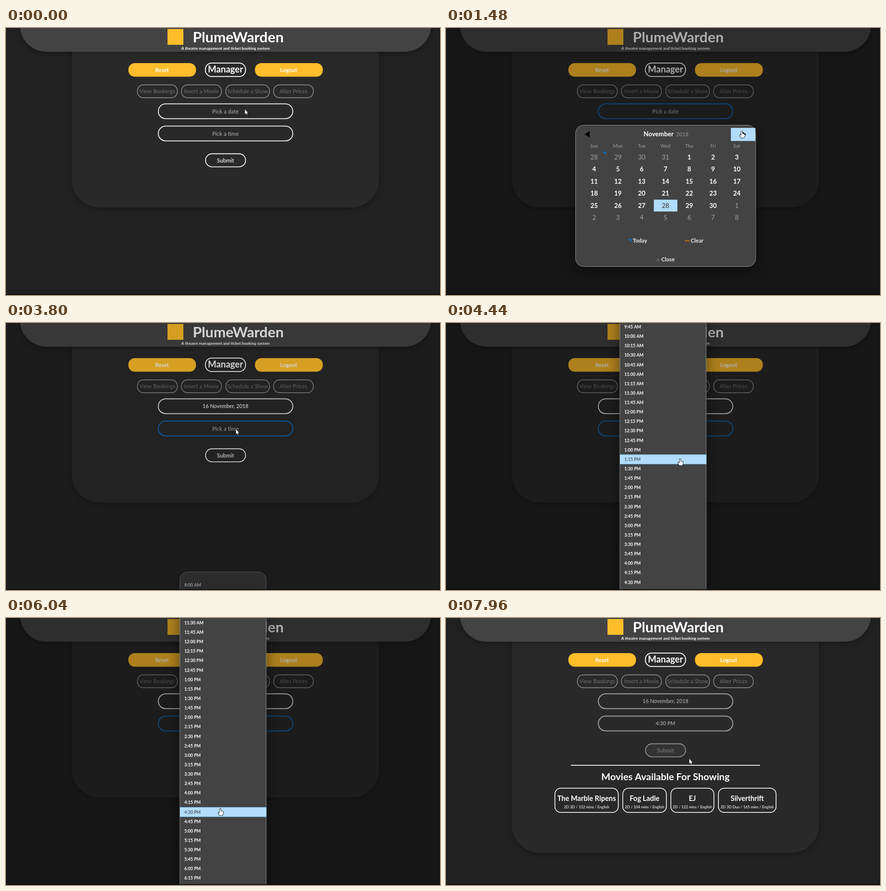
An HTML page with a canvas that plays this animation: 876x540 px, repeating every 8000 ms.

```html
<!DOCTYPE html>
<html lang="en">
<head>
<meta charset="utf-8">
<title>Schedule a show</title>
<style>
html, body { margin: 0; width: 100%; height: 100%; overflow: hidden; background: #212121; }
canvas { display: block; }
</style>
</head>
<body>
<canvas id="stage" width="876" height="540"></canvas>
<script>
const ctx = document.getElementById('stage').getContext('2d');
const LOOP = 8000, ROW = 19.13;
const PICK = '#b1dcfb', GREY = '#434343', GOLD = '#ffbd2b', BLUE = '#0d6cc0';
const SUBMITTED = 7100;

// Keyframes: [time, value, value...], eased between neighbours
const cursorKeys = [
  [0, 482, 164.5], [380, 462, 169], [740, 468, 167], [860, 474, 172], [1380, 597, 209],
  [1520, 597, 209], [1850, 520, 330], [2080, 497, 364], [2460, 550, 304], [3060, 550, 304],
  [3720, 464, 215], [3860, 464, 215], [4300, 472.5, 275], [4700, 472.5, 275],
  [5700, 432.5, 386], [6460, 432.5, 386], [6980, 462, 266], [7140, 462, 266], [7800, 491, 285]
];
const scrollKeys = [[3960, 0], [4380, 196.5], [4760, 196.5], [5240, 262], [5400, 262], [5860, 328.5]];

function track(keys, t) {
  const n = keys.findIndex(k => k[0] > t);
  if (n < 0) return keys[keys.length - 1].slice(1);
  if (n === 0) return keys[0].slice(1);
  const a = keys[n - 1], b = keys[n];
  const u = (t - a[0]) / (b[0] - a[0]), e = u * u * (3 - 2 * u);
  return a.slice(1).map((v, i) => v + (b[i + 1] - v) * e);
}

const clamp = v => Math.max(0, Math.min(1, v));
const easeOut = v => 1 - (1 - clamp(v)) ** 2;
const openness = (t, start, end) => easeOut((t - start) / 160) - easeOut((t - end) / 160);

function text(str, x, y, size, color = '#fff', weight = 400, align = 'center') {
  ctx.font = `${weight} ${size}px Lato, sans-serif`;
  ctx.textAlign = align;
  ctx.fillStyle = color;
  ctx.fillText(str, x, y + size * 0.36);
}

function rect(x, y, w, h, color) {
  ctx.fillStyle = color;
  ctx.fillRect(x, y, w, h);
}

function poly(color, ...pts) {
  ctx.beginPath();
  pts.forEach(([x, y]) => ctx.lineTo(x, y));
  ctx.closePath();
  ctx.fillStyle = color;
  ctx.fill();
}

function box(x0, y0, x1, y1, r, { fill, stroke, line = 1, shadow = 0, drop = 0, dark = 0.5 }) {
  const inset = stroke ? line / 2 : 0;
  ctx.beginPath();
  ctx.roundRect(x0 + inset, y0 + inset, x1 - x0 - 2 * inset, y1 - y0 - 2 * inset, r);
  if (fill) {
    ctx.save();
    ctx.shadowColor = shadow ? `rgba(0,0,0,${dark})` : 'transparent';
    ctx.shadowBlur = shadow;
    ctx.shadowOffsetY = drop;
    ctx.fillStyle = fill;
    ctx.fill();
    ctx.restore();
  }
  if (stroke) {
    ctx.strokeStyle = stroke;
    ctx.lineWidth = line;
    ctx.stroke();
  }
}

function field(y, value, hint, focused, disabled) {
  box(306.5, y - 16, 579.8, y + 15.8, 15, { stroke: focused ? BLUE : disabled ? '#a8a8a8' : '#ececec', line: 1.8 });
  text(value || hint, 443, y, value ? 10.5 : 11.2, value && !disabled ? '#fff' : '#b0b0b0', value ? 500 : 400);
}

function drawMovies(alpha) {
  ctx.globalAlpha = alpha;
  rect(252, 297, 382, 1.6, '#fff');
  text('Movies Available For Showing', 443, 321, 19.5, '#fff', 700);
  [[219, 348.5, 'The Marble Ripens', '2D 3D / 132 mins / English'],
   [356, 445.5, 'Fog Ladle', '2D / 104 mins / English'],
   [453, 541.5, 'EJ', '2D / 122 mins / English'],
   [549, 667, 'Silverthrift', '2D 3D Duo / 165 mins / English']
  ].forEach(([a, b, title, info]) => {
    box(a, 343.5, b, 394, 12, { stroke: '#fff', line: 1.5 });
    text(title, (a + b) / 2, 365, 14.2, '#fff', 700);
    text(info, (a + b) / 2, 382.5, 7.6, '#fff', 500);
  });
  ctx.globalAlpha = 1;
}

function drawPage(t) {
  const done = t >= SUBMITTED;
  rect(0, 0, 876, 540, '#212121');
  box(133, -80, 753, done ? 475 : 363, 56, { fill: '#292929', shadow: 10, drop: 3, dark: 0.25 });
  box(28, -80, 858, 48, 54, { fill: GREY, shadow: 10, drop: 3, dark: 0.3 });
  rect(326, 2, 32, 32, GOLD);
  text('PlumeWarden', 377, 18, 29.3, '#fff', 700, 'left');
  text('A theatre management and ticket booking system', 443, 41, 8.1, '#fff', 700);

  box(247, 71, 383.5, 98.5, 13, { fill: GOLD });
  box(502.5, 71, 639.5, 98.5, 13, { fill: GOLD });
  text('Reset', 315, 85, 11, '#fff', 700);
  text('Logout', 570.5, 85, 11, '#fff', 700);
  box(401.5, 70, 484.5, 99, 13, { stroke: '#fff', line: 1.8 });
  text('Manager', 443, 84, 18, '#fff', 700);

  [[264.5, 346.5, 'View Bookings'], [353.5, 435.5, 'Insert a Movie'],
   [443, 532.5, 'Schedule a Show'], [539.5, 621, 'Alter Prices']
  ].forEach(([a, b, label]) => {
    box(a, 114.3, b, 141.7, 12, { stroke: '#909090', line: 1.4 });
    text(label, (a + b) / 2, 128, 11.1, '#707070');
  });

  field(168.5, t > 2994 ? '16 November, 2018' : '', 'Pick a date', t > 740 && t < 2994, done);
  field(213.5, t > 6440 ? '4:30 PM' : '', 'Pick a time', t > 3750 && t < 6440, done);
  box(402, 253.6, 484.4, 281.5, 13, { stroke: done ? '#949494' : '#fff', line: 1.6, fill: done ? '#333' : '' });
  text('Submit', 443, 268, 11.2, done ? '#7c7c7c' : '#fff', 500);
  if (done) drawMovies(clamp((t - SUBMITTED) / 500));
}

// Both pickers return true when the pointer is over something clickable
function drawCalendar(p, mx, my) {
  const settled = p > 0.98;
  let hot = false;
  ctx.save();
  ctx.globalAlpha = p;
  ctx.translate(0, 700 * (1 - p));
  box(261, 196, 625.5, 483, 16, { fill: GREY, stroke: '#8a8a8a', shadow: 26, drop: 6 });
  if (settled && mx > 575 && mx < 624 && my > 202 && my < 229) {
    rect(575, 202, 49.5, 26.5, PICK);
    hot = true;
  }
  poly('#000', [280, 215], [290, 208.5], [290, 221.5]);
  poly('#000', [606, 215], [596, 208.5], [596, 221.5]);
  text('November', 429, 214, 13, '#fff', 700);
  text('2018', 477, 215, 10.6, '#999', 'italic 400');
  ['Sun', 'Mon', 'Tue', 'Wed', 'Thu', 'Fri', 'Sat'].forEach((d, i) => text(d, 299 + 48 * i, 238, 9.8, '#a0a0a0'));
  for (let i = 0; i < 42; i++) {
    const x = 299 + 48 * (i % 7), y = 261 + 24.55 * Math.floor(i / 7);
    const day = i < 4 ? 28 + i : i < 34 ? i - 3 : i - 33;
    const inMonth = i > 3 && i < 34;
    const over = settled && Math.abs(mx - x) < 24 && Math.abs(my - y) < 12.2;
    const lit = over || i === 31;
    if (over) hot = true;
    if (lit) rect(x - 23.5, y - 12, 47.5, 24, PICK);
    text(day, x, y, 13, lit ? '#333' : inMonth ? '#fff' : '#a3a3a3', inMonth && !lit ? 700 : 400);
  }
  poly(BLUE, [316, 250], [322.5, 250], [322.5, 256]);
  poly(BLUE, [367, 426.5], [374, 426.5], [374, 432.5]);
  text('Today', 377, 430.5, 11, '#eee', 700, 'left');
  rect(482, 429.5, 9.5, 2, '#c87a10');
  text('Clear', 494, 430.5, 11, '#eee', 700, 'left');
  text('×', 428, 469, 11.5, '#999');
  text('Close', 434.5, 468.5, 11, '#eee', 700, 'left');
  ctx.restore();
  return hot;
}

function drawTimes(p, mx, my, scroll) {
  const top = 44 + 920 * (1 - p) - scroll;
  let hot = false;
  ctx.save();
  ctx.globalAlpha = p;
  box(350.5, top, 525.5, top + 1290, 16, { fill: GREY, stroke: '#8a8a8a', shadow: 26, drop: 6 });
  for (let i = 0; i < 64; i++) {
    const y = top + 26.5 + ROW * i;
    if (y < -20 || y > 560) continue;
    const hour = 8 + Math.floor(i / 4), min = String(i % 4 * 15).padStart(2, '0');
    const over = p > 0.98 && mx > 351 && mx < 525 && Math.abs(my - y) <= ROW / 2;
    if (over) {
      hot = true;
      rect(351, y - 10, 174.5, 20, '#5aaee8');
      rect(351, y - 9.3, 174.5, 18.6, PICK);
    }
    text(`${(hour + 11) % 12 + 1}:${min} ${hour < 12 ? 'AM' : 'PM'}`, 360, y, 8.7,
      over ? '#333' : '#fff', over ? 400 : 700, 'left');
  }
  ctx.restore();
  return hot;
}

function drawCursor(x, y, hand) {
  ctx.save();
  ctx.translate(x, y);
  ctx.beginPath();
  const pts = hand
    ? [[-1, 0], [1, 0], [1, 4.5], [5, 5.5], [6, 7], [5.5, 10], [4.5, 13], [-1.5, 13], [-4, 8.5], [-3.5, 7], [-1, 8.5]]
    : [[0, 0], [0, 9.5], [2.2, 7.6], [3.8, 11], [5.3, 10.3], [3.8, 7], [6.5, 6.8]];
  pts.forEach(q => ctx.lineTo(...q));
  ctx.closePath();
  ctx.lineJoin = 'round';
  ctx.lineWidth = 1.6;
  ctx.strokeStyle = '#111';
  ctx.stroke();
  ctx.fillStyle = '#fff';
  ctx.fill();
  ctx.restore();
}

function draw(t) {
  const [mx, my] = track(cursorKeys, t);
  const date = openness(t, 745, 2994), time = openness(t, 3754, 6440);
  let hand = false;
  drawPage(t);
  rect(0, 0, 876, 540, `rgba(0,0,0,${0.32 * Math.max(date, time)})`);
  if (date > 0) hand = drawCalendar(date, mx, my);
  if (time > 0) hand = drawTimes(time, mx, my, track(scrollKeys, t)[0]) || hand;
  rect(0, 538.5, 876, 1.5, '#080808');
  rect(875, 0, 1, 540, '#101010');
  drawCursor(mx, my, hand);
}

function tick(now) {
  draw(now % LOOP);
  requestAnimationFrame(tick);
}
requestAnimationFrame(tick);
</script>
</body>
</html>
```
